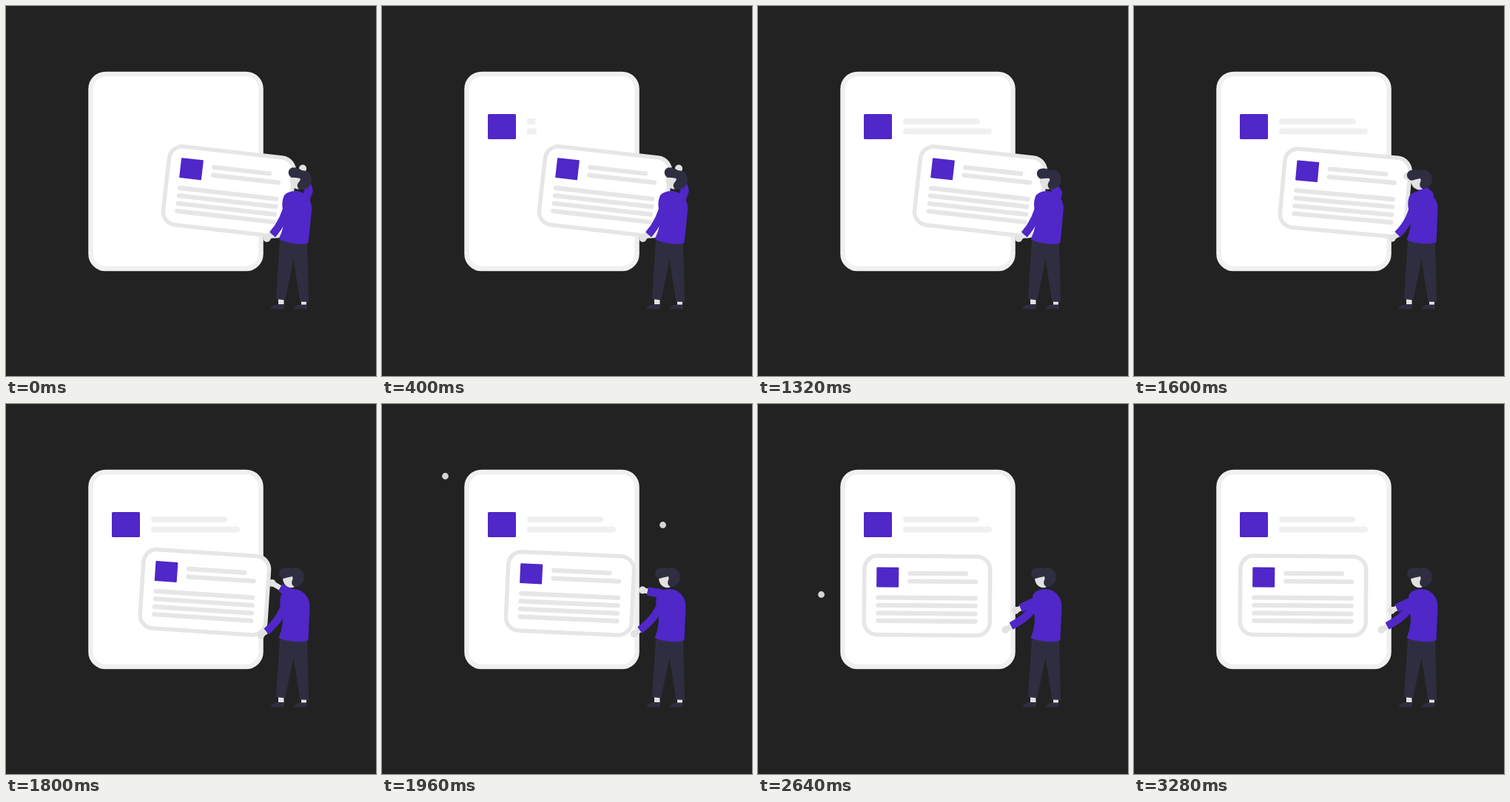
Recreate the animation shown at these times as an HTML page. Size 500 by 500 pixels, loop 3880 ms.

```html
<!DOCTYPE html>
<html lang="en">
<head>
<meta charset="utf-8">
<title>Placing a card</title>
<style>
  html, body { margin: 0; width: 100%; height: 100%; overflow: hidden; background: #222; }
  svg { display: block; width: 100%; height: 100%; }
  .purple { fill: #5027c8; }
  .dark { fill: #2f2e41; }
  .skin { fill: #e2e2e2; }
  .sleeve { fill: none; stroke: #5027c8; stroke-linejoin: round; }
  .wrist { fill: none; stroke: #e2e2e2; stroke-width: 7; }
</style>
</head>
<body>
<svg viewBox="0 0 500 500">
  <rect width="500" height="500" fill="#222"/>
  <g id="dots"></g>

  <rect x="114.5" y="92" width="230" height="263" rx="20" fill="#fff" stroke="#f0f0f0" stroke-width="6.5"/>
  <rect id="icon" class="purple" x="143" y="146" width="38" height="34" rx="1.5"/>
  <g id="bars" fill="#f0f0f0">
    <rect x="196" y="152" width="103.5" height="8" rx="4"/>
    <rect x="196" y="165.5" width="120" height="8" rx="4"/>
  </g>

  <g id="card">
    <rect x="-85" y="-53.3" width="170" height="106.6" rx="18" fill="#fff" stroke="#e6e6e6" stroke-width="5.5"/>
    <rect class="purple" x="-68.5" y="-37.8" width="30" height="27" rx="1"/>
    <path d="M-23.3-30H52.3M-23.3-19.3H65.3M-66 3H65.3M-66 13.4H65.3M-66 24H65.3M-66 34.4H65.3"
      stroke="#e6e6e6" stroke-width="6.2" stroke-linecap="round"/>
  </g>

  <path id="farWrist" class="wrist"/>
  <circle id="farHand" class="skin" r="5"/>
  <path id="farSleeve" class="sleeve" stroke-width="11.5"/>

  <path class="skin" d="M368 395h7.5v9h-7.5zM399 398h7v6h-7z"/>
  <path class="dark" d="M370 316L407 318L409 400L397.5 399.5L388.5 343L377 397.5L365 396Z"/>
  <path class="dark" d="M357.500 409.500Q359 403.500 368 403H376V409.500ZM388.500 409.500Q390 404 399 403.500H406L407 409.500Z"/>

  <g id="torso">
    <g id="head">
      <ellipse class="dark" cx="391" cy="234" rx="11.800" ry="13"/>
      <path class="skin" d="M374 235L386 232Q389 235 386.500 239Q385 245 390 247Q385 250 379 246Q374 242 374 235Z"/>
      <path class="dark" d="M369 230Q368 223 376 221.500Q384 220 390 224L387 233Q381 234 375 236Q370 234 369 230Z"/>
    </g>
    <path class="purple" d="M372 257Q376 251 387 250Q396 250 402 255Q410 262 410.500 273L408.500 319Q403 322.500 389 321Q376 320 368.500 316Q376 298 373 282Q368 268 372 257Z"/>
  </g>

  <path id="nearWrist" class="wrist"/>
  <circle id="nearHand" class="skin" r="5"/>
  <path id="nearSleeve" class="sleeve" stroke-width="10.5"/>
</svg>
<script>
const LOOP = 3880, STEP = 40;
const $ = id => document.getElementById(id);
const set = (el, attrs) => { for (const k in attrs) el.setAttribute(k, attrs[k]); };
const mix = (a, b, k) => a + (b - a) * k;
const smooth = (t, from, to) => {
  const s = Math.min(1, Math.max(0, (t - from) / (to - from)));
  return s * s * (3 - 2 * s);
};

// x, y, colour, then the times of growing and shrinking
const dots = [
  [85.5, 97.5, '#d5d5d5', 1800, 1940, 2080, 2240],
  [379.5, 163.5, '#d5d5d5', 1800, 1940, 2080, 2240],
  [85.5, 257.5, '#d5d5d5', 2480, 2620, 2760, 2920],
  [64.5, 104.5, '#5027c8', 2600, 2800, 2840, 3040],
  [413, 136, '#5027c8', 2600, 2800, 2840, 3040]
].map(([cx, cy, fill, ...times]) => {
  const el = document.createElementNS('http://www.w3.org/2000/svg', 'circle');
  set(el, { cx, cy, fill });
  $('dots').append(el);
  return { el, times };
});

// time, then elbow, wrist and hand of the far arm
const farArm = [
  [600, 409, 250, 404, 232, 401, 219.5],
  [1000, 413, 250, 408, 232, 406, 220],
  [1600, 399, 255, 385, 243, 369, 230],
  [1960, 376, 256, 359, 253, 352, 251.5],
  [2440, 372, 268, 355, 276, 348, 279]
];

function farPose(t) {
  if (t <= farArm[0][0]) return farArm[0].slice(1);
  const i = farArm.findIndex(key => key[0] > t);
  if (i < 0) return farArm[farArm.length - 1].slice(1);
  const a = farArm[i - 1], b = farArm[i];
  const k = (t - a[0]) / (b[0] - a[0]);
  return a.slice(1).map((v, j) => mix(v, b[j + 1], k));
}

function drawHand(side, wx, wy, hx, hy) {
  set($(side + 'Wrist'), { d: `M${wx} ${wy}L${hx} ${hy}` });
  set($(side + 'Hand'), { cx: hx, cy: hy });
}

function render(t) {
  const pop = smooth(t, 0, 360);
  set($('icon'), { transform: `translate(162 163) scale(${pop}) translate(-162 -163)` });
  const grow = 0.107 * smooth(t, 200, 400) + 0.893 * smooth(t, 440, 1040);
  set($('bars'), { transform: `translate(196 0) scale(${grow} 1) translate(-196 0)` });

  const p = smooth(t, 1240, 2440);
  set($('card'), {
    transform: `translate(${mix(300.9, 228.5, p)} ${mix(250.4, 259, p)}) rotate(${mix(6.5, 0.5, p)})`
  });

  const back = smooth(t, 600, 1000), forward = smooth(t, 1000, 1600);
  const lean = mix(mix(3.5, 6.8, back), 0, forward);
  set($('torso'), { transform: `rotate(${lean} 389 319)` });
  set($('head'), { transform: `rotate(${mix(16, 0, forward)} 391 252)` });

  const [ex, ey, wx, wy, hx, hy] = farPose(t);
  set($('farSleeve'), { d: `M${399 + lean} 267L${ex} ${ey}L${wx} ${wy}` });
  drawHand('far', wx, wy, hx, hy);

  const nx = mix(360, 342, p), ny = mix(309, 300, p) + 10 * p * (1 - p);
  set($('nearSleeve'), {
    d: `M${379 + lean} 262Q${mix(377, 373, p)} ${mix(290, 284, p)} ${nx} ${ny}`
  });
  drawHand('near', nx, ny, nx - 7.5, ny + 5);

  for (const { el, times: [a, b, c, d] } of dots)
    set(el, { r: 4.4 * (smooth(t, a, b) - smooth(t, c, d)) });
}

const start = performance.now();
function tick() {
  const t = (performance.now() - start) % LOOP;
  render(Math.floor(t / STEP) * STEP);
  requestAnimationFrame(tick);
}
tick();
</script>
</body>
</html>
```
